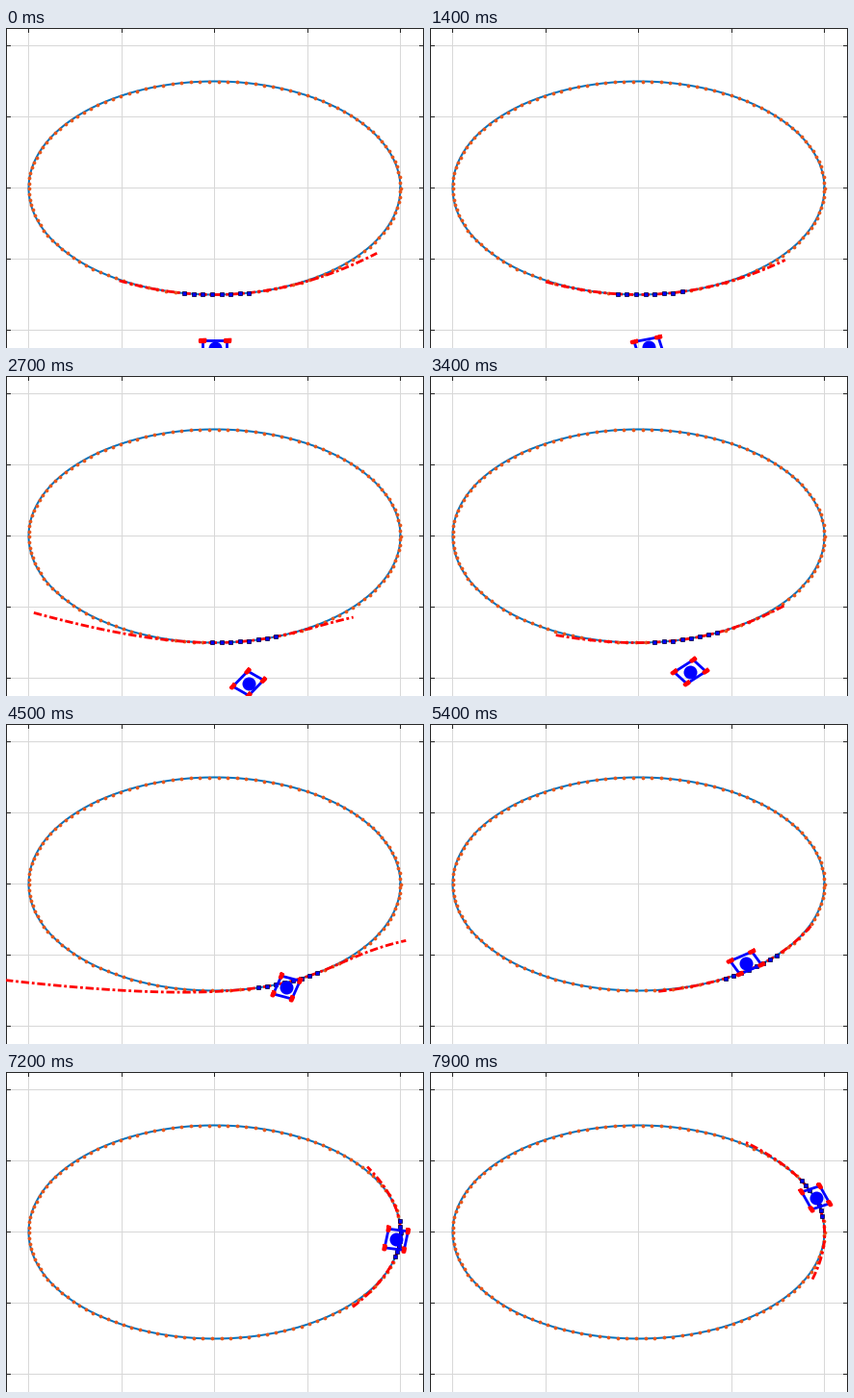
Write a matplotlib script that moves like this. It is 434 px wide and 333 px high and loops after 8 s.

```python
import numpy as np
import matplotlib.pyplot as plt
from matplotlib.animation import FuncAnimation

W, H, DPI = 434, 333, 100
FRAMES, STEP_MS = 80, 100
SX, SY = 19.3, 14.8          # pixels per unit
CX, CY = 216.5, 166.5        # stage position of the world origin
PX = 72 / DPI                # one pixel in points

# time step, x px, y px, heading in degrees, speed in px per step
KEYS = np.array([
    [0, 216.5, 332.8, 0, 0.05],
    [14, 227, 331.8, 14, 1.5],
    [27, 251.5, 319.8, 53.3, 2.9],
    [34, 270, 307.8, 40, 3.7],
    [45, 291.4, 274.1, 71, 5.0],
    [64, 381.8, 219, 52, 6.6],
    [79, 400.5, 130.8, 113.5, 7.7],
])
KT = KEYS[:, 0]
KP = np.column_stack([(KEYS[:, 1] - CX) / SX, (CY - KEYS[:, 2]) / SY])
KH = np.radians(KEYS[:, 3])
KV = KEYS[:, 4:] / SX * np.column_stack([np.cos(KH), np.sin(KH)])

THETA = np.arange(0, 2 * np.pi, 0.05)
TRACK = np.column_stack([10 * np.cos(THETA), 7.5 * np.sin(THETA)])


def pose(t):
    """Position and heading on a cubic Hermite path."""
    i = min(np.searchsorted(KT, t, side="right") - 1, len(KT) - 2)
    d = KT[i + 1] - KT[i]
    s = (t - KT[i]) / d
    p0, p1, m0, m1 = KP[i], KP[i + 1], KV[i] * d, KV[i + 1] * d
    pos = ((2 * s**3 - 3 * s**2 + 1) * p0 + (s**3 - 2 * s**2 + s) * m0
           + (3 * s**2 - 2 * s**3) * p1 + (s**3 - s**2) * m1)
    vel = (6 * (s**2 - s) * (p0 - p1) + (3 * s**2 - 4 * s + 1) * m0
           + (3 * s**2 - 2 * s) * m1)
    return pos, np.arctan2(vel[1], vel[0])


def rotation(a):
    c, s = np.cos(a), np.sin(a)
    return np.array([[c, -s], [s, c]])


def box(a, b):
    return np.array([[a, b], [a, -b], [-a, -b], [-a, b], [a, b]])


BODY = box(0.67, 0.53)
WHEEL = box(0.13, 0.04)

fig = plt.figure(figsize=(W / DPI, H / DPI), dpi=DPI, facecolor="white")
ax = fig.add_axes([0, 0, 1, 1])
ax.set_xlim(-CX / SX, (W - CX) / SX)
ax.set_ylim((CY - H) / SY, CY / SY)
ax.axis("off")


def stage_line(x, y, color="#262626", z=1):
    """One-pixel line in stage coordinates, y pointing down."""
    ax.plot((np.array(x) - CX) / SX, (CY - np.array(y)) / SY, color=color,
            lw=PX, zorder=z, snap=False, solid_capstyle="butt")


for v in range(-10, 11, 5):
    x = np.floor(CX + v * SX + 1e-6) + 0.5
    y = np.floor(CY - v * SY + 1e-6) + 0.5
    stage_line([x, x], [0, H], "#d8d8d8", 0)
    stage_line([0, W], [y, y], "#d8d8d8", 0)
    stage_line([x, x], [0, 5])
    stage_line([0, 5], [y, y])
    stage_line([W - 5, W], [y, y])

stage_line([0.5, 0.5], [0, H])
stage_line([W - 0.5, W - 0.5], [0, H])
stage_line([0, W], [0.5, 0.5])

fine = np.linspace(0, 2 * np.pi, 400)
ax.plot(10 * np.cos(fine), 7.5 * np.sin(fine), color="#0072bd", lw=2 * PX)
ax.plot(*TRACK.T, "o", color="#e8561a", ms=3.8 * PX, mew=0)

fit_line, = ax.plot([], [], color="red", lw=2.8 * PX,
                    ls=(0, (3, 1, 1, 1)), dash_capstyle="butt")
points, = ax.plot([], [], "s", color="blue", ms=5 * PX,
                  mec="#00003c", mew=0.7 * PX)
body, = ax.plot([], [], color="blue", lw=2.8 * PX, solid_joinstyle="miter")
hub, = ax.plot([], [], "o", color="blue", ms=14 * PX, mew=0)
wheels = [ax.plot([], [], color="red", lw=3.3 * PX)[0] for _ in range(4)]


def update(n):
    pos, heading = pose(n)
    rot = rotation(heading)
    near = np.argmin(np.hypot(*(TRACK - pos).T))
    ahead = TRACK[np.arange(near - 3, near + 5) % len(TRACK)]

    # cubic through the next points, in the car's own frame
    local = (ahead - pos) @ rot
    coef = np.polyfit(local[:, 0], local[:, 1], 3)
    u = np.linspace(local[3, 0] - 5, local[3, 1] + 5, 120)
    curve = np.column_stack([u, np.polyval(coef, u)]) @ rot.T + pos

    fit_line.set_data(*curve.T)
    points.set_data(*ahead.T)
    body.set_data(*(BODY @ rot.T + pos).T)
    hub.set_data([pos[0]], [pos[1]])
    for wheel, corner in zip(wheels, BODY):
        wheel.set_data(*((WHEEL + corner) @ rot.T + pos).T)
    return [fit_line, points, body, hub, *wheels]


anim = FuncAnimation(fig, update, frames=FRAMES, interval=STEP_MS,
                     repeat=True, repeat_delay=0, blit=False)
plt.show()
```
